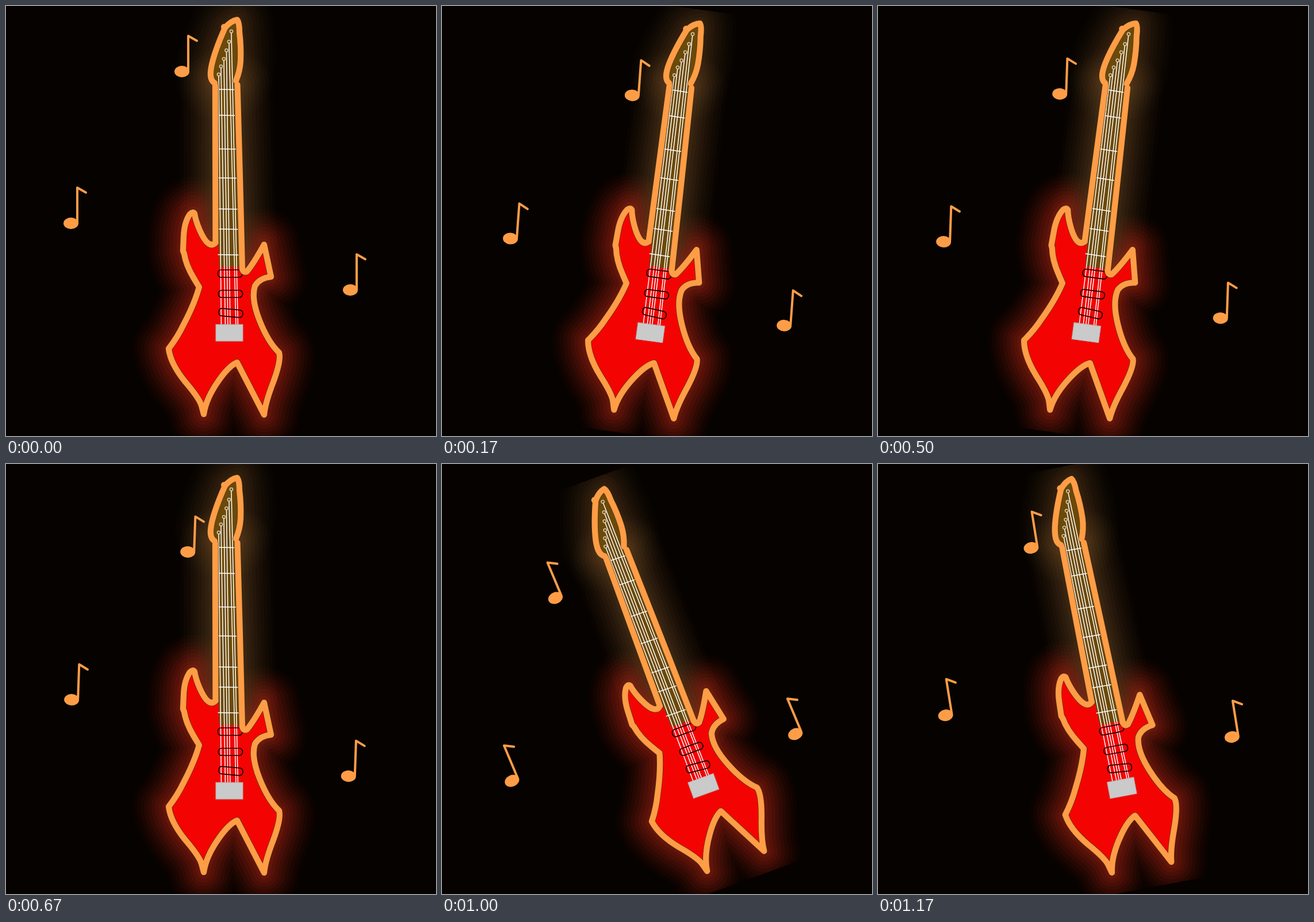
Write an HTML page that moves like this. It is 748 px wide and 748 px high and loops after 1340 ms.

```html
<!DOCTYPE html>
<html lang="en">
<head>
<meta charset="utf-8">
<title>Swinging guitar</title>
<style>
html, body { margin: 0; width: 100%; height: 100%; overflow: hidden; background: #060200; }
svg { display: block; width: 100vw; height: 100vh; }
</style>
</head>
<body>
<svg viewBox="0 0 748 748">
  <defs>
    <clipPath id="sheet"><rect width="748" height="748"/></clipPath>
    <path id="head" d="M363 134C354 129 355 116 358 102Q364 76 381 38Q391 26 402 24Q406 29 406 46Q409 70 408 95Q407 113 400 130"/>
    <path id="neck" d="M364 138L364.500 412M402.500 137L407 300L411 457"/>
    <path id="body" d="M364.500 412Q352 424 337 390Q330 374 328 361Q325 357 320 362Q310 376 309 402L308 426L310 431Q313 451 327 474L336 489Q328 518 309 554Q298 577 283 596Q286 622 312 654Q336 682 340 695L344 710Q348 682 371 650Q388 626 402 620L449 711Q451 690 465 654Q479 616 475 603Q456 585 441 547Q426 509 433 487Q441 473 461 471L449 415Q430 449 419 462Q412 465 411 455"/>
    <g id="note" stroke="#ff9d47" stroke-width="4" stroke-linecap="round" stroke-linejoin="round">
      <ellipse rx="13" ry="10" fill="#ff9d47" stroke="none"/>
      <path d="M11 -2L11 -62L26 -53.500" fill="none"/>
    </g>
  </defs>
  <g id="guitar">
    <g id="glow" clip-path="url(#sheet)" fill="none" stroke-linejoin="round" stroke-linecap="round"></g>
    <use href="#body" fill="#f30403"/>
    <use href="#head" fill="#6b4908"/>
    <path d="M366 128H401L407 300L410 454H371L366 300Z" fill="#6b4908"/>
    <g id="strings" stroke="#fff" stroke-width="1.500" fill="none"></g>
    <rect x="365" y="554" width="47" height="29" fill="#cacaca" stroke="#b5a9a6"/>
    <g fill="none" stroke="#0c0000" stroke-width="1.700">
      <rect x="368.500" y="459" width="42.500" height="13" rx="5.500"/>
      <rect x="369.500" y="494.500" width="42" height="12.500" rx="5.500"/>
      <rect x="370" y="527.500" width="42" height="13" rx="5.500" transform="rotate(5 391 534)"/>
    </g>
    <g id="rim" fill="none" stroke-linejoin="round" stroke-linecap="round"></g>
    <circle cx="379.500" cy="36.500" r="5.500" fill="#ff9d47"/>
  </g>
  <g id="notes">
    <use href="#note" x="306" y="114"/>
    <use href="#note" x="113" y="378"/>
    <use href="#note" x="599" y="494"/>
  </g>
</svg>
<script>
const LOOP = 1340;
const $ = id => document.getElementById(id);

function add(parent, tag, attrs) {
  const el = document.createElementNS("http://www.w3.org/2000/svg", tag);
  for (const k in attrs) el.setAttribute(k, attrs[k]);
  parent.appendChild(el);
}

// Banded halo: wide faint strokes under narrower, stronger ones
const BANDS = 9;
for (let i = 0; i < BANDS; i++) {
  const width = 2 * (62 - i * 6.3);
  const alpha = 0.03 + 0.09 * i / (BANDS - 1);
  for (const part of ["head", "neck", "body"]) {
    const red = part === "body";
    add($("glow"), "use", {
      href: "#" + part, "stroke-width": width,
      stroke: red ? "#b82a18" : "#6b4a25",
      opacity: part === "head" ? alpha * 0.75 : alpha
    });
  }
}

for (const [color, width] of [["#553708", 11.6], ["#ff9d47", 10.2]])
  for (const part of ["head", "neck", "body"])
    add($("rim"), "use", { href: "#" + part, stroke: color, "stroke-width": width });

// Each string: peg x, peg y, x at the bridge
const strings = [
  [370, 119, 374.5], [374, 105, 381.5], [379, 92, 386],
  [383.5, 77, 390], [388, 62, 400], [392, 44, 403.5]
];
for (const [x, y, end] of strings) {
  add($("strings"), "circle", { cx: x, cy: y, r: 2.6, stroke: "#dccbb0" });
  add($("strings"), "line", { x1: x, y1: y + 3, x2: end, y2: 557 });
}
for (const y of [145, 190, 248.5, 299, 353, 388, 432.5])
  add($("strings"), "line", { x1: 368.5, y1: y, x2: 397 + (y - 145) / 36, y2: y + 0.6 });

// Guitar: angle and shift. Notes: angle and centre of the group.
const still = [0, 0, 0];
const left = [-10.7, 0, 1];
const right = [7.7, 0, -0.5];
const low = [2, 342, 368.7];
const poses = [
  { at: 0, guitar: still, notes: [0, 339.3, 328.7] },
  { at: 170, guitar: right, notes: [4.2, 348.3, 372] },
  { at: 330, guitar: [16, -1, 4], notes: [9, 352, 398] },
  { at: 500, guitar: right, notes: low },
  { at: 670, guitar: still, notes: low },
  { at: 830, guitar: left, notes: [-10.1, 321, 334.3] },
  { at: 1000, guitar: [-19.9, 1, 8], notes: [-22.8, 311.3, 418] },
  { at: 1170, guitar: left, notes: [-9.1, 333.3, 352.7] }
];

function draw(time) {
  const t = time % LOOP;
  const pose = poses.filter(p => p.at <= t).pop();
  const [turn, dx, dy] = pose.guitar;
  const [tilt, x, y] = pose.notes;
  $("guitar").setAttribute("transform", `translate(${dx} ${dy}) rotate(${turn} 374 374)`);
  $("notes").setAttribute("transform", `translate(${x} ${y}) rotate(${tilt}) translate(-339.3 -328.7)`);
}

const start = performance.now();
function tick() {
  draw(performance.now() - start);
  requestAnimationFrame(tick);
}
tick();
</script>
</body>
</html>
```
